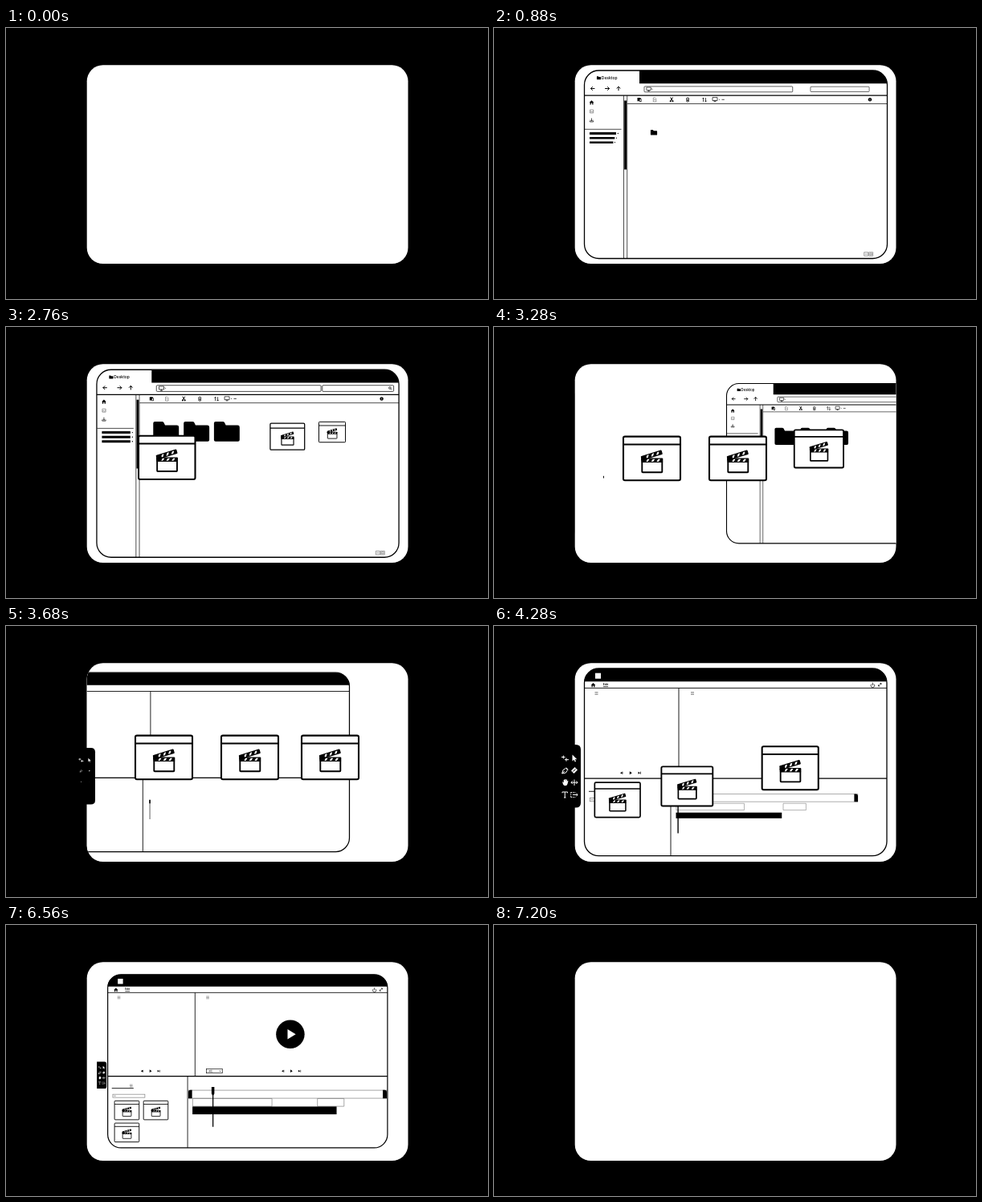
These frames come from a looping animation (600x338 px, 7480 ms). An HTML page:

```html
<!DOCTYPE html>
<html lang="en">
<head>
<meta charset="utf-8">
<title>From desktop to edit</title>
<style>
html, body { margin: 0; width: 100%; height: 100%; overflow: hidden; background: #000; }
svg { display: block; width: 100vw; height: 100vh; }
text { font-family: Inter, "Open Sans", sans-serif; }
.ln { fill: none; stroke: #000; stroke-width: .7; }
.mid { fill: none; stroke: #000; stroke-width: 1; stroke-linecap: round; stroke-linejoin: round; }
.frame { fill: none; stroke: #000; stroke-width: 1.3; }
.rule { fill: none; stroke: #000; stroke-width: .9; }
.tool { fill: none; stroke: #fff; stroke-width: 1; stroke-linejoin: round; }
.tool .solid { fill: #fff; stroke: none; }
.dim { fill: none; stroke: #777; stroke-width: .7; }
</style>
</head>
<body>
<svg viewBox="0 0 600 338" preserveAspectRatio="xMidYMid meet">
<defs>
  <clipPath id="cardClip"><rect x="100.7" y="46.3" width="399.8" height="247.8" rx="20"/></clipPath>
  <clipPath id="toolClip"><rect x="60" y="40" width="440.5" height="260"/></clipPath>
  <g id="folder"><path d="M-16-10.5q0-2 2-2H-5q1.5 0 2.2 1.3L-1.2-8H13.5q2.5 0 2.5 2.5V10.5q0 2-2 2H-14q-2 0-2-2Z"/></g>
  <g id="clip">
    <rect x="-35.5" y="-27.2" width="71" height="54.6" rx="2" fill="#fff" stroke="#000" stroke-width="2.1"/>
    <path d="M-35.5-17.3H35.5" stroke="#000" stroke-width="2"/>
    <rect x="-12.2" y="4" width="25" height="13.4" rx=".8" fill="#fff" stroke="#000" stroke-width="1.9"/>
    <g id="slate">
      <rect x="-13.2" y="-.3" width="27" height="5.6" rx="1"/>
      <path d="M-5.5.9h2.6L-5 4.1h-2.6ZM1.2.9h2.6L1.7 4.1H-.9ZM7.9.9h2.6L8.4 4.1H5.8Z" fill="#fff"/>
    </g>
    <use href="#slate" transform="translate(.8 -2.6) rotate(-17 -13 5)"/>
    <circle cx="-9.8" cy="1.2" r="3.6"/>
  </g>
  <g id="screen"><path class="ln" d="M-3-2.4H3V1.5H-3ZM0 1.5V2.8M-1.5 2.8H1.5"/></g>
  <g id="home"><path d="M-2.8 0L0-2.7 2.8 0H2V2.5H.7V.6H-.7V2.5H-2V0Z"/></g>
  <g id="menu"><path class="dim" d="M-2-1.5H2M-2 0H2M-2 1.5H2"/></g>
  <g id="transport">
    <path d="M-10.5-1.5V1.5L-13 0ZM-1.2-2V2L1.8 0ZM9.5-1.5V1.5L12 0Z"/>
    <path class="ln" d="M-10-1.5V1.5M12.5-1.5V1.5"/>
  </g>
</defs>

<rect x="100.7" y="46.3" width="399.8" height="247.8" rx="20" fill="#fff"/>

<g clip-path="url(#cardClip)">
  <g id="explorer">
    <rect x="112.5" y="53" width="377" height="234.5" rx="18" fill="#fff"/>
    <path d="M181 53H471.500a18 18 0 0 1 18 16.200H181Z"/>
    <rect class="frame" x="112.5" y="53" width="377" height="234.5" rx="18"/>
    <use href="#folder" transform="translate(130.5 62.2) scale(.16)"/>
    <text x="133.8" y="63.9" font-size="5" font-weight="500">Desktop</text>
    <path class="mid" d="M125 75.500H120.500M122.500 73.500L120.500 75.500 122.500 77.500M138.500 75.500H143.500M141.500 73.500L143.500 75.500 141.500 77.500M155 77.800V73.200M153 75.200L155 73.200 157 75.200"/>
    <path class="frame" d="M112.5 84.200H489.500"/>
    <path class="ln" d="M166 94.500H489.500M161.500 84.200V287.500M165.700 84.200V287.500M113 126.300H158.500"/>
    <rect x="162.2" y="90.5" width="2.8" height="86"/>

    <g id="address">
      <rect class="ln" x="187" y="72.5" width="205.300" height="7.700" rx="1"/>
      <use href="#screen" x="193.200" y="76.200"/><path class="ln" d="M197.600 75.400l.7.800-.7.800"/>
    </g>
    <g id="search">
      <rect class="ln" x="394" y="72.5" width="89" height="7.7" rx="1"/>
      <g id="lens"><circle class="ln" cx="478.3" cy="75.8" r="1.3"/><path class="ln" d="M479.3 76.8l1.3 1.3"/></g>
    </g>
    <g id="bar0"><path d="M119 130h35.500v3H119Z"/><circle cx="157" cy="131.500" r=".7"/></g>
    <g id="bar1"><path d="M119 135.700h35.500v3H119Z"/><circle cx="157" cy="137.200" r=".7"/></g>
    <g id="bar2"><path d="M119 141.200h35.500v3H119Z"/><circle cx="157" cy="142.700" r=".7"/></g>

    <use href="#home" x="121.5" y="93"/>
    <path class="dim" d="M119.5 102h4.200v4h-4.200ZM119.500 105l1.300-1 1.200 1 1.700-1.500"/>
    <path class="ln" d="M121.500 112.500V116M120 114.700l1.500 1.500 1.500-1.500M119.300 115.500v1.500h4.400v-1.500"/>
    <path d="M178.500 87h4v1.300h1V92h-2.300v-.7h-2.700Z"/><path d="M181.500 89h1.300v2.200h-1.300Z" fill="#fff"/>
    <path class="dim" d="M198.300 87h2.300l1.200 1.200V92h-3.500ZM199.200 89.500h1.700"/>
    <path class="mid" d="M219.800 86.800l2.400 3.700M222.400 86.800l-2.400 3.700"/>
    <circle cx="219.7" cy="91.2" r="1"/><circle cx="222.5" cy="91.2" r="1"/>
    <path class="ln" d="M239.200 87.600h3.800M239.600 88l.3 4h2.400l.3-4M240.500 86.900h1.200M240.600 89v2M241.600 89v2"/>
    <path class="ln" d="M260.500 92V87M259.300 88.300l1.200-1.300 1.200 1.300M263.500 87v5M262.300 90.700l1.200 1.300 1.200-1.300"/>
    <use href="#screen" x="275" y="89"/>
    <path class="ln" d="M280 89.300h1M283.500 89.300h3.300"/>
    <circle cx="468" cy="89.3" r="2.2"/><path d="M468 88v2.600" stroke="#fff" stroke-width=".5"/>
    <path class="dim" d="M460.700 279.700h5v4.500h-5ZM466.700 279.700h5v4.500h-5ZM461.700 282h3M468 281h2.500v2H468Z"/>

    <g id="folder0"><use href="#folder" x="199" y="130.3"/></g>
    <g id="folder1"><use href="#folder" x="237" y="130.3"/></g>
    <g id="folder2"><use href="#folder" x="274.8" y="130.3"/></g>
  </g>

  <g id="editor">
    <rect x="112.5" y="53" width="376.5" height="233.7" rx="18" fill="#fff"/>
    <path d="M112.5 69.3a18 16.300 0 0 1 18-16.300H471a18 16.300 0 0 1 18 16.300Z"/>
    <rect class="frame" x="112.5" y="53" width="376.5" height="233.7" rx="18"/>
    <path class="rule" d="M112.5 77.400H489M230 77.400V190M220 190V286.700"/>
    <path class="frame" d="M112.5 190.200H489"/>

    <g id="logo"><rect x="126" y="58.7" width="7" height="7" fill="#fff"/></g>
    <g id="home2"><use href="#home" x="123.5" y="73.8"/></g>
    <g id="edit"><text x="139" y="74.3" font-size="3.5" font-weight="600" text-anchor="middle">Edit</text><path class="ln" d="M136 75.600h6.200"/></g>
    <g id="corner"><path class="ln" d="M470 72.500a2.300 2.300 0 1 0 2.800 0M471.400 70.700v3.300M478.500 75l3.500-3.500M480.300 71.500H482V73.200M478.500 73.300V75h1.700"/></g>
    <g id="menu0"><use href="#menu" x="127.5" y="84"/></g>
    <g id="menu1"><use href="#menu" x="247" y="84"/></g>
    <g id="trans0"><use href="#transport" x="170" y="183.2"/></g>
    <g id="trans1"><use href="#transport" x="359.5" y="183.2"/></g>
    <g id="fit"><rect class="ln" x="245.3" y="180.2" width="21.4" height="5.7"/><text x="248.5" y="184.7" font-size="4">Fit</text><path class="ln" d="M262.7 182.500l1.100 1.200 1.100-1.200"/></g>
    <g id="panel">
      <use href="#menu" x="144" y="203"/>
      <path class="rule" d="M118 206.300h29.300"/>
      <rect class="dim" x="119.3" y="214.5" width="43.2" height="4.3"/><path class="dim" d="M120.500 216.700h3"/>
    </g>

    <g id="track">
      <rect class="dim" x="221.3" y="209" width="266.5" height="10.8"/>
      <path d="M226 208.700V220H221V211.700q0-3 3-3ZM482.700 208.700H485q3 0 3 3V220H482.700Z"/>
    </g>
    <g id="clips"><path class="dim" d="M226.800 220.200H333.500v10.500H226.800ZM394.700 220.200H430.500v10.500H394.700Z"/></g>
    <g id="sound"><rect x="226.5" y="231" width="194" height="10.5"/></g>
    <g id="head"><path d="M227.200 204.700h3.800v8.800l-1.200 2.500V258.500h-1.400V216l-1.200-2.500Z"/></g>
    <g id="play"><circle cx="358.2" cy="133.5" r="19.2"/><path d="M354.500 126.800L365.500 133.500 354.500 140.200Z" fill="#fff"/></g>
  </g>

  <g id="files">
    <g id="file0"><use href="#clip"/></g>
    <g id="file1"><use href="#clip"/></g>
    <g id="file2"><use href="#clip"/></g>
  </g>
</g>

<g clip-path="url(#toolClip)">
  <g id="toolbar">
    <path d="M80 148H102q6 0 6 6V220.500q0 6-6 6H80Z"/>
    <g class="tool">
      <g id="tool0"><path d="M84 163.500h4.500M88 166.700h5M86.300 161.500v4M90 164.700v4"/></g>
      <g id="tool1"><path class="solid" d="M97.500 160.500v8l2-1.700 1.300 2.700 1.300-.6-1.300-2.600h2.500Z"/></g>
      <g id="tool2"><path d="M84.700 184l1.300-4.500 3.500-2 2 2-2 3.500ZM84.700 184l3-3M89.700 176.500l2.700 2.700"/></g>
      <g id="tool3"><path class="solid" d="M96 180.500l4.500-4.500 3.500 3.500-4.500 4.500Z"/><path d="M98.500 181.500l3-3" stroke="#000"/></g>
      <g id="tool4"><path class="solid" d="M85 194l1.700 1.200V191.700h1.200V194l.3-3h1.200v3l.6-2.600h1.100l-.3 3 .7-1.500h1l-1 4q-.6 2.400-2.800 2.400-2 0-2.700-1.800Z"/></g>
      <g id="tool5"><path d="M100 191.500v7.500M96 195.200h8M97.600 193.500l-1.700 1.700 1.700 1.700M102.400 193.500l1.700 1.700-1.700 1.700"/></g>
      <g id="tool6"><path d="M85 208.300v-1.300h6.500v1.300M88.250 207v7M87 214h2.500"/></g>
      <g id="tool7"><path d="M95.700 207.500h5.500M95.700 213.500h5.500M95.700 207.500v6" stroke-dasharray="1.300 1"/><path d="M98 210.500h6M102.500 208.900l1.700 1.600-1.700 1.600"/></g>
    </g>
  </g>
</g>
</svg>

<script>
const LOOP = 7480, STEP = 40;
const $ = id => document.getElementById(id);

// cubic ease in and out of the span that begins at `start`
function ease(t, start, span = 800) {
  const p = Math.min(1, Math.max(0, (t - start) / span));
  return p < .5 ? 4 * p ** 3 : 1 - 4 * (1 - p) ** 3;
}
const mix = (a, b, k) => a + (b - a) * k;

// parts that scale up: id, pivot x, pivot y, start, span
const grow = [
  ['address', 187, 76.3, 314], ['search', 394, 76.3, 364], ['lens', 479, 76.5, 760, 600],
  ['bar0', 119, 131.5, 288], ['bar1', 119, 137.2, 328], ['bar2', 119, 142.7, 360],
  ['folder0', 199, 130.3, 560], ['folder1', 237, 130.3, 810], ['folder2', 274.8, 130.3, 1040],
  ['logo', 129.5, 62, 3680, 500], ['home2', 123.5, 73.5, 3680, 500], ['edit', 139, 74, 3700, 500],
  ['corner', 475, 73.3, 3720, 500], ['menu0', 127.5, 84, 3700, 500], ['menu1', 247, 84, 3720, 500],
  ['trans0', 170, 183, 3720, 540], ['trans1', 359.5, 183, 3760, 540], ['fit', 256, 183, 4270, 600],
  ['panel', 118, 210, 3700, 560], ['track', 221, 214.5, 3736], ['clips', 227, 225.5, 3778],
  ['sound', 226.5, 236.3, 3825], ['play', 358.2, 133.5, 4300, 620]
];
for (let i = 0; i < 8; i++) {
  grow.push(['tool' + i, 88.5 + 11.5 * (i % 2), 165 + 15 * (i >> 1), 3310 + 45 * i, 600]);
}

// pop = first appearance, lift = enlarging, drop = into the project panel
const files = [
  { from: [314, 131], mid: [196.5, 163.8], to: [138.2, 236], pop: 800, lift: 2120, drop: 3804 },
  { from: [360, 131], mid: [303.5, 163.8], to: [177.2, 236], pop: 920, lift: 2480, drop: 3880 },
  { from: [406, 131], mid: [403.5, 163.8], to: [138.2, 266], pop: 1040, lift: 2840, drop: 4024 }
];
const SMALL = .466;

function scaleAt(id, x, y, k, dx = 0) {
  const el = $(id);
  el.style.visibility = k < .004 ? 'hidden' : 'inherit';
  el.setAttribute('transform', `translate(${x + dx} ${y}) scale(${Math.max(k, .001)}) translate(${-x} ${-y})`);
}

// windows slide in small from the left, shrink and leave to the right
function slide(id, t, enter, leave) {
  const dx = 361 * (ease(t, enter, 640) - 1 + ease(t, leave + 320, 640));
  const k = .85 + .15 * (ease(t, enter + 55, 640) - ease(t, leave, 640));
  scaleAt(id, 301, 170, k, dx);
  $(id).style.visibility = Math.abs(dx) > 360.9 ? 'hidden' : 'visible';
}

function draw(t) {
  slide('explorer', t, 20, 2660);
  slide('editor', t, 3253, 6240);
  slide('files', t, -2000, 6240);

  for (const [id, x, y, start, span] of grow) scaleAt(id, x, y, ease(t, start, span));
  scaleAt('head', 229.1, 231.6, ease(t, 3386, 600), 25 * ease(t, 5380));

  files.forEach((f, i) => {
    const up = ease(t, f.lift), down = ease(t, f.drop);
    const [x, y] = [0, 1].map(n => mix(mix(f.from[n], f.mid[n], up), f.to[n], down));
    const lifted = mix(SMALL, 1, ease(t, f.lift - 40));
    const size = mix(lifted, SMALL, ease(t, f.drop + 112)) * ease(t, f.pop);
    const el = $('file' + i);
    el.setAttribute('transform', `translate(${x} ${y}) scale(${Math.max(size, .001)})`);
    el.style.visibility = size < .004 ? 'hidden' : 'inherit';
  });

  const open = ease(t, 3114) - ease(t, 6140);
  scaleAt('toolbar', 94, 187.2, open, 44 * (1 - open));
}

const begin = performance.now();
function tick() {
  const t = (performance.now() - begin) % LOOP;
  draw(Math.floor(t / STEP) * STEP);
  requestAnimationFrame(tick);
}
tick();
</script>
</body>
</html>
```
